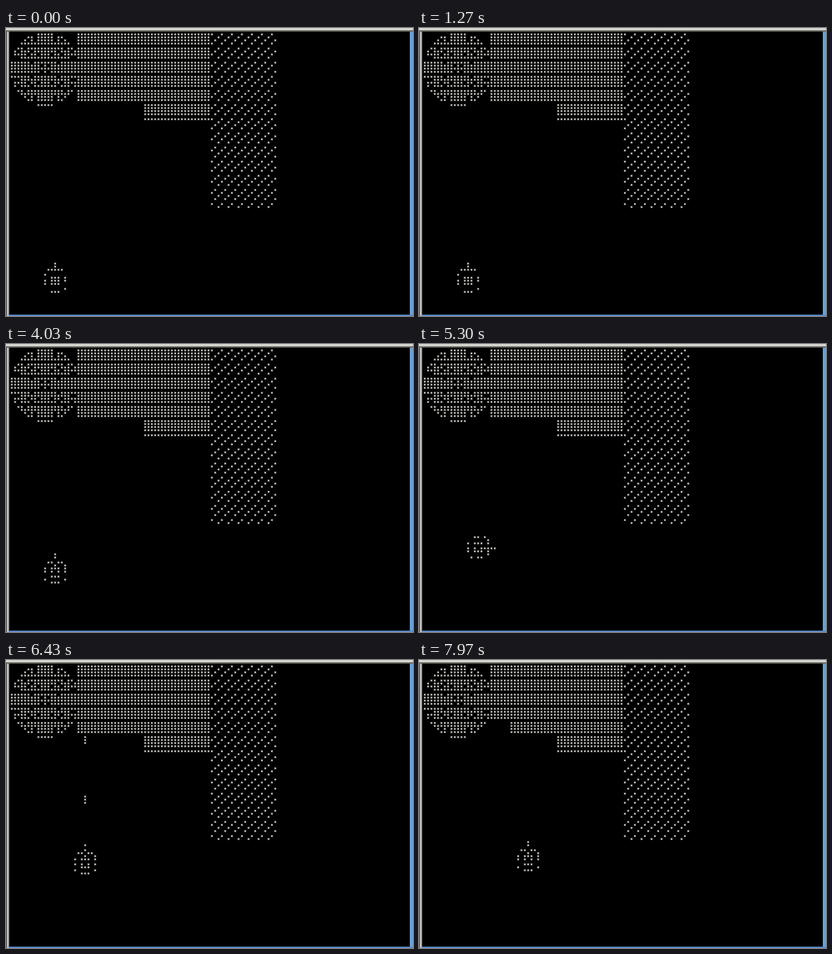
Recreate the animation shown at these times as an HTML page with a canvas. Size 889x630 px, loop 8 s.

```html
<!DOCTYPE html>
<html lang="en">
<head>
<meta charset="utf-8">
<title>Dot matrix ship</title>
<style>
  html, body { margin: 0; width: 100%; height: 100%; overflow: hidden; background: #000; }
  canvas { display: block; }
</style>
</head>
<body>
<canvas id="stage" width="889" height="630"></canvas>
<script>
const ctx = document.getElementById('stage').getContext('2d');
const LOOP = 8000;

// Each text row is one matrix row; column 5 is the ship's centre.
const POSES = {
  idle: [
    '.....#.....',
    '.....#.....',
    '...#####...',
    '..#........',
    '....###.#..',
    '..#.###.#..',
    '..#.###....',
    '........#..',
    '....###....'],
  up: [
    '.....#.....',
    '.....#.....',
    '...##.##...',
    '.....#..#..',
    '..#.###.#..',
    '..#.#.#.#..',
    '....###....',
    '..#.....#..',
    '....###....'],
  right: [
    '....##.#...',
    '........#..',
    '..#.###.#..',
    '..#.#.#####',
    '..#.###.#..',
    '........#..',
    '...#.##....']
};
const CENTRE_ROW = { idle: 5, up: 5, right: 3 };

// Ship keys: start time, column, row, pose
const COURSE = [
  [0, 13, 70, 'idle'], [2970, 13, 69, 'idle'],
  [3270, 13, 68, 'up'], [3400, 13, 67, 'up'],
  ...run(3900, 42, 10, i => [13, 66 - i, 'up']),
  [4630, 13, 56, 'up'], [4730, 13, 56, 'right'],
  [4800, 14, 56, 'right'], [4870, 15, 56, 'right'],
  ...run(5300, 55, 7, i => [16 + i, 56, 'right']),
  [5830, 22, 56, 'up'], [6950, 22, 55, 'up'], [7030, 22, 54, 'up'],
  [7130, 22, 54, 'right'],
  ...run(7230, 140, 4, i => [23 + i, 54, 'right']),
  ...run(7700, 50, 5, i => [27 + i, 55, 'right']),
  [7960, 31, 55, 'up']
];
const SHOTS = [6030, 6253, 6440];
const SHOT_COL = 22, SHOT_SPEED = 0.074, MUZZLE = 50, SURFACE = 20;

function run(start, step, count, key) {
  return Array.from({ length: count }, (_, i) => [start + i * step, ...key(i)]);
}

const colX = c => 12.6 + 7.285 * c;
const rowY = r => 14 + 30.93 * (r >> 2) + [0, 6.5, 13, 20][r & 3];

function dot(c, r) {
  const x = colX(c), y = rowY(r);
  box('#3a3a38', x - 2.5, y - 2.5, 5, 5);
  box('#cacac4', x - 1.6, y - 1.6, 3.2, 3.2);
}

function box(color, x, y, w, h) {
  ctx.fillStyle = color;
  ctx.fillRect(x, y, w, h);
}

function drawWindow() {
  box('#000', 0, 0, 889, 630);
  box('#d6d6d0', 0, 0, 889, 5);
  box('#66665f', 0, 5, 889, 3);
  box('#55534f', 0, 8, 2, 622);
  box('#c4c4c4', 2, 8, 4, 622);
  box('#333', 6, 8, 2, 618);
  box('#6f9fd2', 882, 8, 7, 622);
  box('#5d8ac8', 6, 627, 883, 3);
}

// Time at which a dot of the wall is shot away
function goneAt(c, r) {
  if (c > 25 || r < 16 || r > 19) return Infinity;
  const scatter = (c * 37 + r * 53) % 11;
  return Math.min(7750, 6450 + 110 * Math.hypot(c - SHOT_COL, r - 19) + scatter * 85);
}

function drawScenery(t) {
  // concentric rings, leaving gaps between some of them
  for (let r = 0; r <= 20; r++)
    for (let c = 0; c <= 19; c++) {
      const d = Math.hypot(c - 10, r - 10), ring = Math.round(d);
      if (ring <= 10 && Math.abs(d - ring) < 0.4) dot(c, r);
    }
  for (let r = 0; r < 25; r++)
    for (let c = r < 20 ? 20 : 40; c < 60; c++)
      if (t < goneAt(c, r)) dot(c, r);
  for (let r = 0; r < 50; r++)
    for (let c = 60; c < 80; c++)
      if ((c + r) % 3 === 0) dot(c, r);
}

function drawShots(t) {
  for (const fired of SHOTS) {
    const head = Math.round(MUZZLE - (t - fired) * SHOT_SPEED);
    if (t < fired || head < SURFACE - 2) continue;
    for (let r = head; r < head + 3; r++) if (r >= SURFACE) dot(SHOT_COL, r);
  }
  if (t >= 6900 && t < 7400) dot(SHOT_COL, SURFACE);
}

function drawShip(t) {
  const [, col, row, pose] = COURSE.findLast(key => key[0] <= t);
  POSES[pose].forEach((line, y) => [...line].forEach((mark, x) => {
    if (mark === '#') dot(col + x - 5, row + y - CENTRE_ROW[pose]);
  }));
}

function frame(now) {
  const t = now % LOOP;
  drawWindow();
  drawScenery(t);
  drawShots(t);
  drawShip(t);
  requestAnimationFrame(frame);
}
requestAnimationFrame(frame);
</script>
</body>
</html>
```
